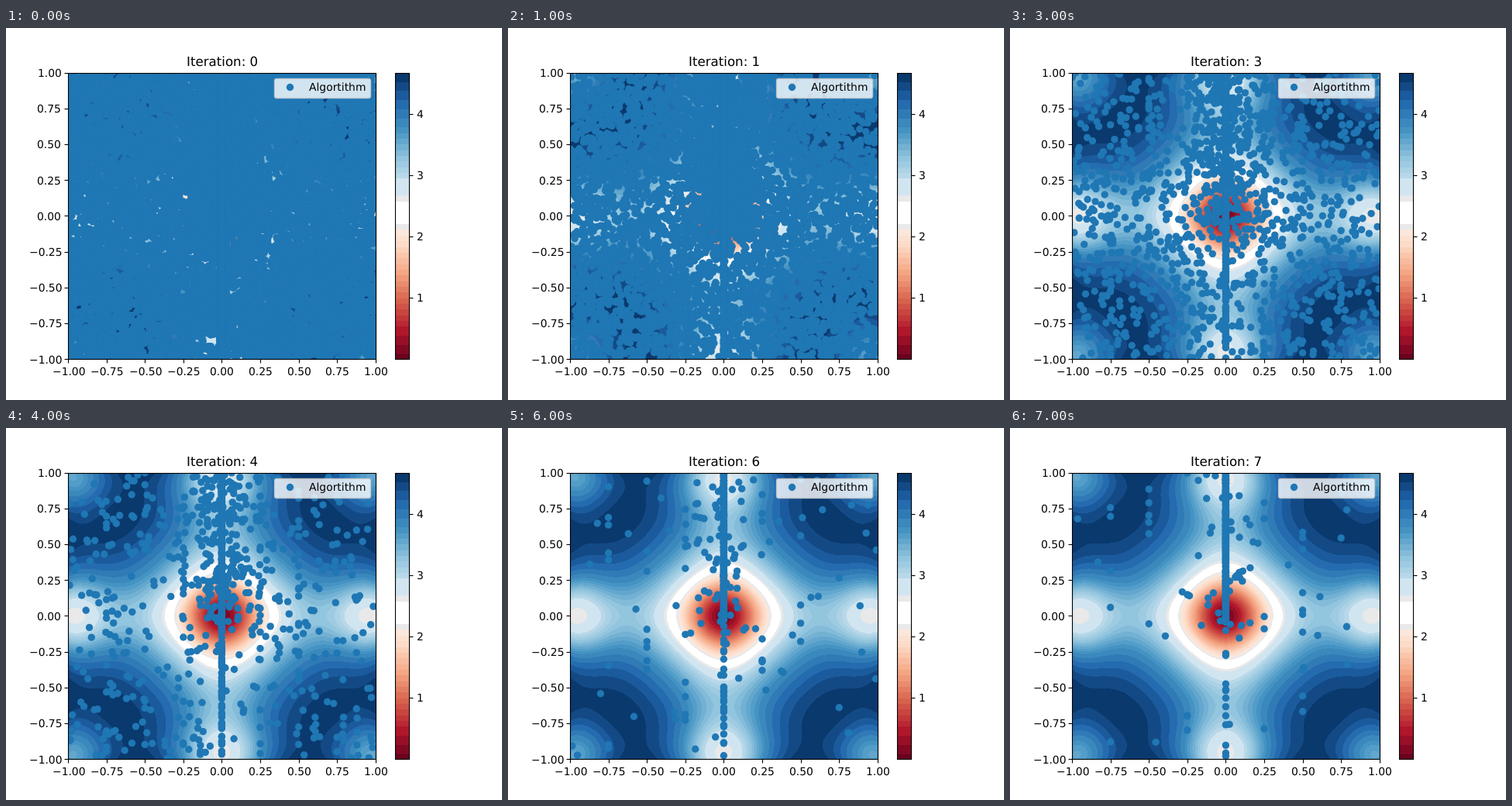
An HTML page with a canvas that plays this animation: 640x480 px, repeating every 8000 ms.

```html
<!DOCTYPE html>
<html lang="en">
<head>
<meta charset="utf-8">
<title>Iterations</title>
<style>
html, body { margin: 0; overflow: hidden; background: #fff; }
canvas { display: block; }
</style>
</head>
<body>
<canvas id="stage" width="640" height="480"></canvas>
<script>
const ctx = document.getElementById('stage').getContext('2d');
const LEFT = 80, TOP = 57.6, W = 396.8, H = 369.6, BOTTOM = TOP + H;
const MAX = 4.67, DOT = '#1f77b4';
const px = x => LEFT + (x + 1) / 2 * W;
const py = y => TOP + (1 - y) / 2 * H;
const barY = v => BOTTOM - v / MAX * H;
const snap = v => Math.floor(v + 0.5) + 0.5;

// Diverging red-blue colour map with flat steps around its white centre
const ramp = ['67001f', 'b2182b', 'd6604d', 'f4a582', 'fddbc7', 'f7f7f7',
  'd1e5f0', '92c5de', '4393c3', '2166ac', '053061']
  .map(h => [0, 2, 4].map(i => parseInt(h.substr(i, 2), 16)));

function colorAt(y) {
  const offset = Math.abs(y - 240);
  if (offset < 13) return [255, 255, 255];
  if (offset < 20) return [233, 233, 233];
  if (y > 195 && y < 220) return ramp[6];
  const t = (BOTTOM - y) / H * 10, k = Math.min(9, Math.max(0, Math.floor(t)));
  return ramp[k].map((c, i) => Math.round(c + (ramp[k + 1][i] - c) * (t - k)));
}

// Bands along the colour bar, wider towards both dark ends
const bands = [];
for (let y = 58; y < 427;) {
  const end = y + (y < 125 || y > 380 ? 11.7 : 7.35);
  bands.push({ start: y, end, color: colorAt((y + end) / 2) });
  y = end;
}

function ackley(x, y) {
  const wave = Math.cos(2 * Math.PI * x) + Math.cos(2 * Math.PI * y);
  return 20 - 20 * Math.exp(-0.2 * Math.sqrt((x * x + y * y) / 2)) + Math.E - Math.exp(wave / 2);
}

function makeField() {
  const c = document.createElement('canvas');
  c.width = 398; c.height = 370;
  const g = c.getContext('2d'), img = g.createImageData(c.width, c.height);
  for (let j = 0, p = 0; j < c.height; j++) {
    for (let i = 0; i < c.width; i++, p += 4) {
      const x = (80.5 + i - px(0)) / W * 2, y = (py(0) - 58.5 - j) / H * 2;
      const level = barY(ackley(x, y));
      const band = bands.find(b => level < b.end) || bands[bands.length - 1];
      img.data.set([...band.color, 255], p);
    }
  }
  g.putImageData(img, 0, 0);
  return c;
}
const field = makeField();

function seeded(seed) {
  return () => {
    seed = seed + 0x6D2B79F5 | 0;
    let t = Math.imul(seed ^ seed >>> 15, 1 | seed);
    t = t + Math.imul(t ^ t >>> 7, 61 | t) ^ t;
    return ((t ^ t >>> 14) >>> 0) / 4294967296;
  };
}

function dot(x, y) {
  ctx.beginPath();
  ctx.arc(x, y, 4.7, 0, 7);
  ctx.fill();
}

// The population thins out, and gathers on quarter columns and the vertical axis
function drawPopulation(n) {
  const rnd = seeded(n * 97 + 11);
  const between = (a, b) => a + (b - a) * rnd();
  const anywhere = () => between(-1, 1);
  const bell = () => rnd() + rnd() + rnd() + rnd() - 2;
  const scatter = (count, x, y) => {
    for (let i = 0; i < count; i++) dot(px(x()), py(y()));
  };
  ctx.fillStyle = DOT;
  scatter(9500 * Math.exp(-0.62 * n - 0.045 * n * n), anywhere, anywhere);
  scatter(200 * 0.78 ** n, () => Math.round(between(-3.5, 3)) / 4, anywhere);
  scatter(1300 * 0.6 ** n, () => bell() * 0.2, () => between(-0.1, 1));
  scatter(320, () => 0, () => between(-0.03, 1));
  scatter(500 * 0.6 ** n, () => 0, () => -(rnd() ** 1.5));
}

function line(x1, y1, x2, y2) {
  ctx.beginPath();
  ctx.moveTo(x1, y1);
  ctx.lineTo(x2, y2);
  ctx.stroke();
}

// Aligns by inked width (0 left, 0.5 centre, 1 right), on whole pixels
function text(str, x, y, align, size = 13.89) {
  ctx.font = size + 'px "DejaVu Sans", sans-serif';
  ctx.textRendering = 'geometricPrecision';
  ctx.fillStyle = '#000';
  const m = ctx.measureText(str);
  const ink = m.actualBoundingBoxLeft + m.actualBoundingBoxRight;
  ctx.fillText(str, Math.round(x - ink * align), Math.round(y));
}

function drawAxes() {
  ctx.strokeStyle = '#000';
  ctx.lineWidth = 1.11;
  ctx.strokeRect(80.5, 58.5, 397, 369);
  for (let v = -1; v <= 1; v += 0.25) {
    const label = v.toFixed(2).replace('-', '\u2212');
    const x = snap(px(v)), y = snap(py(v));
    line(x, 428, x, 432.5);
    line(75.5, y, 80, y);
    text(label, px(v), 448, 0.5);
    text(label, 70.3, py(v) + 5.3, 1);
  }
}

function drawColorBar() {
  bands.forEach(({ start, end, color }) => {
    ctx.fillStyle = `rgb(${color})`;
    ctx.fillRect(502, Math.round(start), 18.5, Math.min(428, Math.round(end)) - Math.round(start));
  });
  ctx.strokeRect(502.5, 58.5, 18, 369);
  for (let v = 1; v <= 4; v++) {
    line(521, snap(barY(v)), 525.5, snap(barY(v)));
    text(v, 530.2, barY(v) + 5.3, 0);
  }
}

function drawLegend() {
  ctx.beginPath();
  ctx.roundRect(346.5, 65.5, 124, 25, 2.8);
  ctx.fillStyle = 'rgba(255,255,255,.8)';
  ctx.strokeStyle = 'rgba(204,204,204,.8)';
  ctx.lineWidth = 1.39;
  ctx.fill();
  ctx.stroke();
  ctx.fillStyle = DOT;
  dot(366.5, 76.5);
  text('Algortithm', 391, 81, 0);
}

function draw(n) {
  ctx.fillStyle = '#fff';
  ctx.fillRect(0, 0, 640, 480);
  ctx.save();
  ctx.beginPath();
  ctx.rect(80, 58, 398, 370);
  ctx.clip();
  ctx.drawImage(field, 80, 58);
  drawPopulation(n);
  ctx.restore();
  drawAxes();
  drawColorBar();
  drawLegend();
  text('Iteration: ' + n, 278.4, 49, 0.5, 16.67);
}

let shown = -1;
function tick() {
  const n = Math.floor(performance.now() / 1000) % 8;
  if (n !== shown) draw(shown = n);
  requestAnimationFrame(tick);
}
tick();
</script>
</body>
</html>
```
